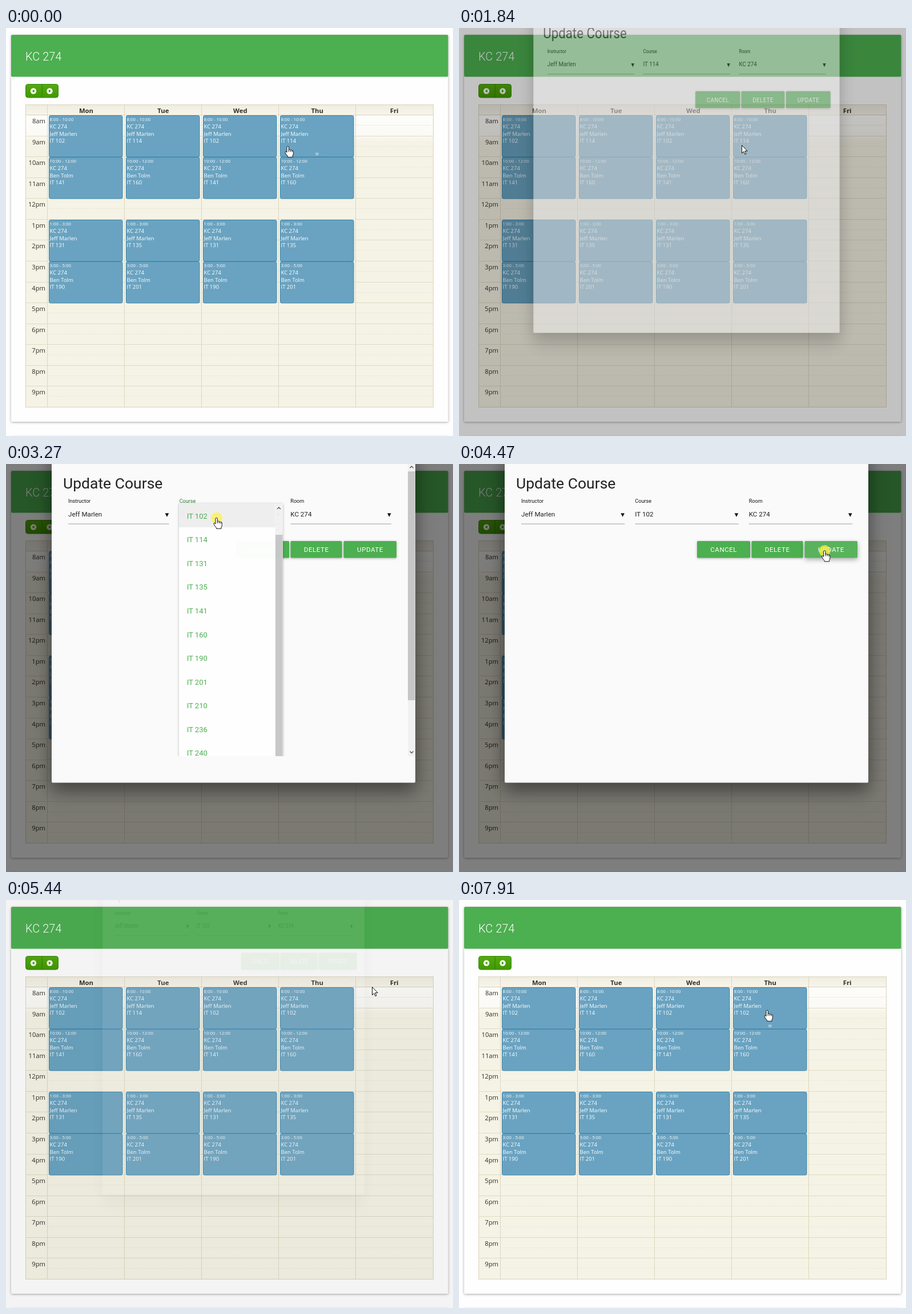
An HTML page for the animation above (7.99 s loop, 783 by 715 pixels).

```html
<!DOCTYPE html>
<html lang="en">
<head>
<meta charset="utf-8">
<title>Course calendar</title>
<style>
  html, body { margin: 0; width: 100%; height: 100%; overflow: hidden; background: #fefefe; }
  svg { display: block; }
  text { white-space: pre; }
  .page { font-family: "Open Sans", sans-serif; }
  .roboto { font-family: Roboto, sans-serif; }
  .card { filter: drop-shadow(0 1px 2px rgba(0,0,0,.35)); }
  .panel { filter: drop-shadow(0 14px 14px rgba(0,0,0,.3)) drop-shadow(0 10px 18px rgba(0,0,0,.2)); }
  .raised { filter: drop-shadow(0 1.5px 2px rgba(0,0,0,.28)); }
  .hover { filter: drop-shadow(0 3px 4px rgba(0,0,0,.32)); }
</style>
</head>
<body>
<svg id="stage" width="783" height="715" viewBox="0 0 783 715">
  <defs>
    <linearGradient id="sheet" x1="0" y1="0" x2="0" y2="1">
      <stop offset="0" stop-color="#fdfdfa"/>
      <stop offset=".72" stop-color="#fbfaf5"/>
      <stop offset="1" stop-color="#f5f3e5"/>
    </linearGradient>
    <linearGradient id="nav" x1="0" y1="0" x2="0" y2="1">
      <stop offset="0" stop-color="#55aa14"/>
      <stop offset=".5" stop-color="#4aa206"/>
      <stop offset="1" stop-color="#429800"/>
    </linearGradient>
    <linearGradient id="days" x1="0" y1="0" x2="0" y2="1">
      <stop offset="0" stop-color="#f0ecdf"/>
      <stop offset="1" stop-color="#f7f5ec"/>
    </linearGradient>
    <clipPath id="listClip"><rect id="listWindow" x="294" y="60" width="200"/></clipPath>
    <clipPath id="updateClip"><rect x="605.5" y="135" width="92.5" height="29.5" rx="1.5"/></clipPath>
  </defs>
</svg>
<script>
const LOOP = 7990;
const PEOPLE = ["Jeff Marlen", "Ben Tolm"];
const GREEN = "#4caf50";
const $ = id => document.getElementById(id);

function add(parent, tag, attrs = {}, text) {
  const node = document.createElementNS("http://www.w3.org/2000/svg", tag);
  set(node, attrs);
  if (text !== undefined) node.textContent = text;
  return parent.appendChild(node);
}
function set(node, attrs) {
  for (const key in attrs) node.setAttribute(key, attrs[key]);
}
const rect = (parent, x, y, width, height, fill, more) =>
  add(parent, "rect", { x, y, width, height, fill, ...more });
const line = (parent, d, stroke, more) =>
  add(parent, "path", { d, stroke, fill: "none", ...more });
const label = (parent, x, y, size, fill, text, more) =>
  add(parent, "text", { x, y, "font-size": size, fill, ...more }, text);
const show = (node, on) => { node.style.display = on ? "" : "none"; };

const stage = $("stage");

// Calendar page
const page = add(stage, "g", { class: "page" });
rect(page, 0, 0, 783, 715, "#fefefe");
rect(page, 9, 12, 765.5, 678, "#fefefe", { rx: 2, class: "card" });
rect(page, 9, 716, 765.5, 20, "#fefefe", { class: "card" });
rect(page, 9, 12, 765.5, 73.5, GREEN, { rx: 2 });
label(page, 34, 56.5, 20, "#fff", "KC 274", { class: "roboto", "font-weight": 300 });

rect(page, 34.5, 98.5, 57, 23.5, "url(#nav)", { rx: 4, stroke: "#3a8a05" });
line(page, "M63 99V122", "#327e04");
[48, 76.5].forEach((x, i) => {
  add(page, "circle", { cx: x, cy: 110.5, r: 5.2, fill: "#f4faee" });
  const side = i ? 1 : -1;
  add(page, "path", { d: `M${x - side * 1.5} 107.8v5.4l${side * 3.6}-2.7z`, fill: "#3f9400" });
});

rect(page, 34.5, 134.5, 714, 530, "#f5f3e5");
rect(page, 34.5, 153, 714, 47, "url(#sheet)");
rect(page, 34.5, 134.5, 714, 18, "url(#days)");
for (let hour = 0; hour < 14; hour++) {
  const y = Math.floor(152.5 + hour * 36.57) + .5;
  line(page, `M34.5 ${y}H748.5`, hour ? "#e1dbc6" : "#d8d2bb");
  line(page, `M73 ${y + 18}H748`, "#ebe7d6", { "stroke-dasharray": "1 .5" });
  label(page, 69, y + 14.5, 11.2, "#312e25",
    (hour + 7) % 12 + 1 + (hour < 4 ? "am" : "pm"), { "text-anchor": "end" });
}
["Mon", "Tue", "Wed", "Thu", "Fri"].forEach((day, i) => {
  line(page, `M${72.5 + i * 135} 134.5V664.5`, "#ddd7c1");
  label(page, 140.5 + i * 134.9, 149, 11.3, "#312e25", day,
    { "text-anchor": "middle", "font-weight": 700 });
});
rect(page, 34.5, 134.5, 714, 530, "none", { stroke: "#d9d3bc" });

const SLOTS = [
  ["8:00 - 10:00", 153, [102, 114]],
  ["10:00 - 12:00", 226, [141, 160]],
  ["1:00 - 3:00", 336, [131, 135]],
  ["3:00 - 5:00", 409, [190, 201]]
];
let editedRoom;
for (let day = 0; day < 4; day++) {
  SLOTS.forEach(([time, y, courses], slot) => {
    const x = 75 + day * 135, left = x + 1.5;
    rect(page, x + .5, y + .5, 128.5, 72.5, "#6aa3c1", { rx: 2.5, stroke: "#3a85ad" });
    label(page, left, y + 10, 7.8, "#fff", time);
    label(page, left, y + 22.5, 9.5, "#fff", "KC 274");
    label(page, left, y + 35.5, 9.5, "#fff", PEOPLE[slot % 2]);
    const room = label(page, left, y + 48.3, 9.5, "#fff", "IT " + courses[day % 2]);
    if (day === 3 && slot === 0) editedRoom = room;
  });
}
const grip = line(page, "M542 219.5h5.5M542 222h5.5", "#e6f0f5");

// Dialog
const shade = rect(stage, 0, 0, 783, 715, "#000");
const modal = add(stage, "g", { class: "roboto" });
rect(modal, 80, -30, 637, 588.5, "#fafafa", { rx: 2, class: "panel" });
label(modal, 100, 42.5, 26.5, "#212121", "Update Course");

const fields = [["Instructor", PEOPLE[0]], ["Course", "IT 114"], ["Room", "KC 274"]].map(([name, value]) => {
  const group = add(modal, "g");
  return {
    group,
    name: label(group, 0, 68, 9.1, "#111", name),
    value: label(group, 0, 91.7, 11.6, "#212121", value),
    rule: line(group, "", "#9e9e9e"),
    arrow: add(group, "path", { d: "M-7 86.2h6.6l-3.3 6.6z", fill: "#111" })
  };
});

const buttons = add(modal, "g");
const [, , update] = [["CANCEL", 417, 93], ["DELETE", 512.5, 90], ["UPDATE", 605.5, 92.5]].map(([text, x, width]) => {
  const box = rect(buttons, x, 135, width, 29.5, GREEN, { rx: 1.5, class: "raised" });
  label(buttons, x + width / 2 + .2, 153.8, 11.6, "#fff", text,
    { "text-anchor": "middle", "letter-spacing": .5 });
  return box;
});
const ripple = add(add(buttons, "g", { "clip-path": "url(#updateClip)" }), "circle",
  { cx: 640, cy: 152, fill: "#fff" });

const scrollbar = add(modal, "g");
rect(scrollbar, 704, 0, 13, 512, "#f1f1f1");
rect(scrollbar, 704, 13, 12.5, 401, "#c6c6c6");
line(scrollbar, "M707.5 7l3-3 3 3M707.5 503.5l3 3 3-3", "#4c5a3c", { "stroke-width": 1.4 });

const list = add(modal, "g", { "clip-path": "url(#listClip)" });
rect(list, 303, 69, 182, 480, "#fff", { class: "raised" });
rect(list, 303, 69, 168.5, 42, "#eee");
[102, 114, 131, 135, 141, 160, 190, 201, 210, 236, 240].forEach((course, i) =>
  label(list, 316.7, 95.8 + i * 41.55, 13.1, GREEN, "IT " + course));
rect(list, 471.5, 69, 13.5, 480, "#f1f1f1");
rect(list, 472, 124, 12.5, 420, "#c8c8c8");
line(list, "M475 79l3-3 3 3", "#4c5a3c", { "stroke-width": 1.4 });

// Pointer
const pointer = add(stage, "g");
const halo = add(pointer, "circle", { cx: 0, cy: .8, r: 10, fill: "#fff04a", opacity: .75 });
const ink = { fill: "#fff", stroke: "#111", "stroke-linejoin": "round" };
const hand = add(pointer, "path", { ...ink, d:
  "M-2 1.8Q-2 .3-.4 .3Q1.3 .3 1.3 1.8V6.3Q4 5.6 4.4 7Q6.8 6.3 7.2 7.8Q9.4 7.4 9.4 9.5V12.5Q9.4 15 8 17V19.3H-.5V17.8" +
  "Q-3 15-4.6 12Q-5.6 9.8-4.4 9.2Q-3.2 8.8-2 11ZM1.3 6.3V10M4.4 7V10M7.2 7.8V10.5" });
const arrow = add(pointer, "path", { ...ink, d:
  "M.5 .5V14.5L3.7 11.4 5.9 16.4 8 15.5 5.8 10.6H10.2Z" });

const PATH = [
  [0, 494, 207], [30, 494, 207], [260, 493, 207], [420, 501, 207], [590, 493, 206.5],
  [770, 493, 206.5], [930, 496, 206], [1100, 494, 206], [1250, 494, 206], [1840, 495, 205],
  [2020, 497, 166], [2400, 371, 102], [2530, 369, 94], [3480, 369, 94], [4060, 640, 152],
  [4210, 640.5, 151.5], [5440, 641, 152], [5500, 641, 152], [5870, 543, 199.5], [6380, 495, 205],
  [6660, 494, 205], [6750, 498, 205], [6840, 495, 205], [7020, 494, 205], [7200, 494.5, 205],
  [7370, 494, 205], [7910, 540, 193], [LOOP, 540, 193]
];
const CLICKS = [1250, 1460, 2680, 3270, 4470];
const ARROW_TIMES = [[1672, 2290], [3510, 3980], [5400, 5660]];

const within = (t, [from, to]) => t >= from && t < to;
const progress = (t, start, length) => Math.min(1, Math.max(0, (t - start) / length));
const swing = p => .5 - Math.cos(p * Math.PI) / 2;

function pointerAt(t) {
  const i = Math.max(1, PATH.findIndex(key => key[0] > t));
  const [t0, x0, y0] = PATH[i - 1], [t1, x1, y1] = PATH[i];
  const p = swing(progress(t, t0, t1 - t0));
  return [x0 + (x1 - x0) * p, y0 + (y1 - y0) * p];
}

function drawModal(t) {
  const closing = t > 5000;
  const open = closing ? 1 - swing(progress(t, 5248, 235)) : swing(progress(t, 1672, 350));
  show(modal, open > 0);
  show(shade, open > 0);
  const away = 1 - open;
  const scale = 1 - .3 * (closing ? away ** .87 : away);
  set(shade, { opacity: open * .5 });
  set(modal, { opacity: open, transform: `translate(${398.5 * (1 - scale)} ${-46 * away}) scale(${scale} 1)` });

  // The open list overflows the dialog, whose scrollbar narrows the form.
  const scrolling = within(t, [2815, 3475]);
  const width = scrolling ? 584 : 598, column = width / 3;
  show(scrollbar, scrolling);
  fields.forEach((field, i) => {
    set(field.group, { transform: `translate(${109 + column * i} 0)` });
    set(field.rule, { d: `M0 105H${column - 18}` });
    set(field.arrow, { transform: `translate(${column - 18} 0)` });
  });
  fields[1].name.setAttribute("fill", within(t, [2680, 3475]) ? "#2e7d32" : "#111");
  fields[1].value.textContent = t < 3270 ? "IT 114" : "IT 102";
  set(buttons, { transform: `translate(${width - 598} 0)` });

  show(list, within(t, [2690, 3475]));
  const unroll = progress(t, 2690, 300);
  set($("listWindow"), { height: Math.min(452, 9 + 552 * (1 - (1 - unroll) ** 3)) });
  set(list, { opacity: swing(unroll) * (1 - swing(progress(t, 3250, 225))) });

  const hovered = within(t, [3980, 5400]);
  set(update, { fill: hovered ? "#58b35c" : GREEN, class: hovered ? "hover" : "raised" });
  const wave = progress(t, 4470, 430);
  set(ripple, { r: 75 * (1 - (1 - wave) ** 2), opacity: .35 * (1 - wave) });
}

function draw(t) {
  editedRoom.textContent = t < 5100 ? "IT 114" : "IT 102";
  show(grip, t < 1672 || t >= 5660);
  drawModal(t);
  set(pointer, { transform: `translate(${pointerAt(t)})` });
  const isArrow = ARROW_TIMES.some(span => within(t, span));
  show(arrow, isArrow);
  show(hand, !isArrow);
  show(halo, CLICKS.some(start => within(t, [start, start + 180])));
}

const start = performance.now();
function frame() {
  draw((performance.now() - start) % LOOP);
  requestAnimationFrame(frame);
}
frame();
</script>
</body>
</html>
```
